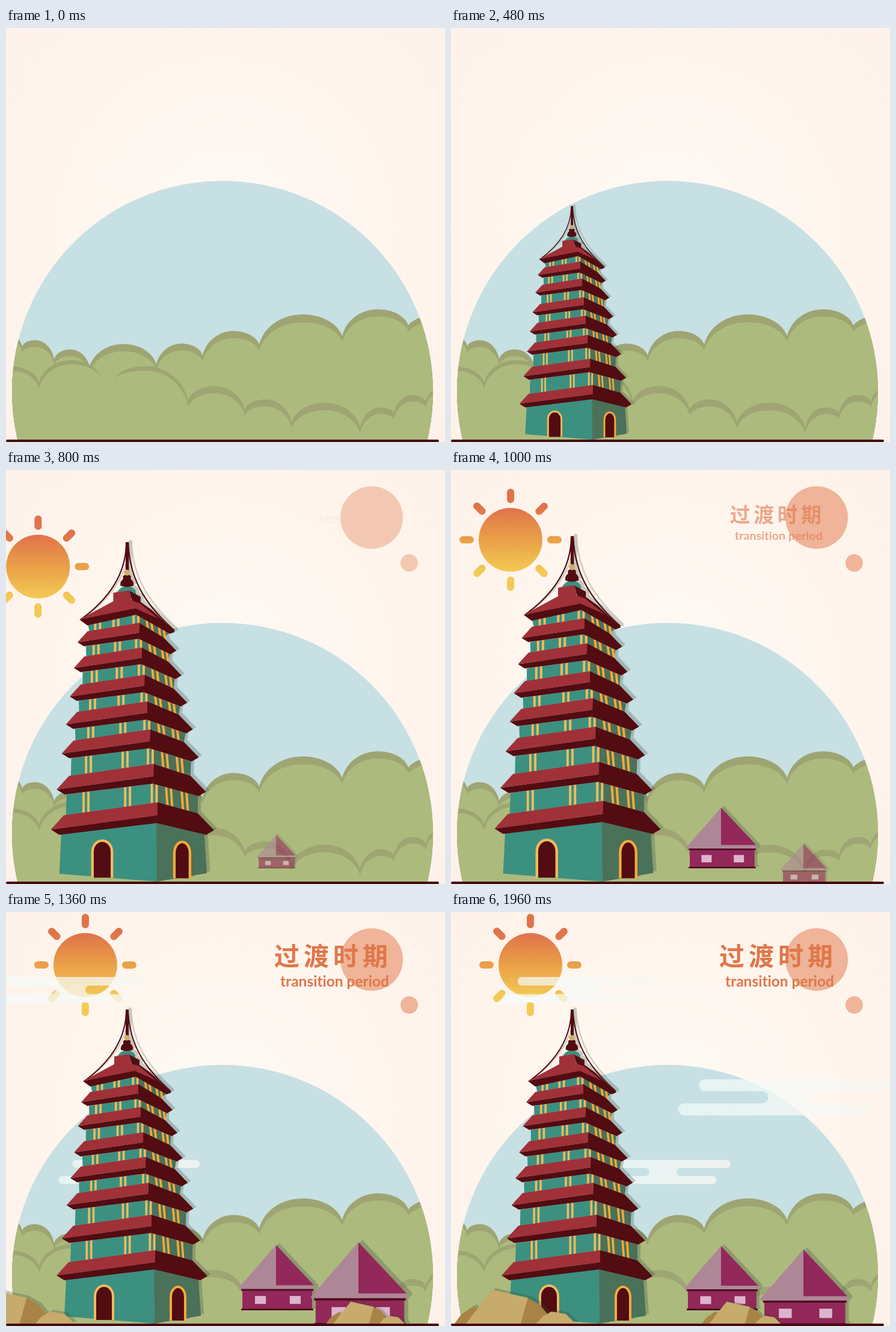
Animation, 730 px wide and 688 px high, one loop 2 s. Source, as an HTML page:

```html
<!DOCTYPE html>
<html lang="zh">
<head>
<meta charset="utf-8">
<style>
html, body { margin: 0; width: 100%; height: 100%; overflow: hidden; background: #fef3eb; }
svg { display: block; }
.shade { filter: drop-shadow(5px -3px 0 rgba(50, 75, 55, .27)); }
#title { font-weight: 700; font-variant-ligatures: none; }
</style>
</head>
<body>
<svg width="730" height="688" viewBox="0 0 730 688" xmlns="http://www.w3.org/2000/svg">
  <defs>
    <radialGradient id="paper" gradientUnits="userSpaceOnUse" cx="365" cy="330" r="520">
      <stop offset="0" stop-color="#fffaf4"/><stop offset="1" stop-color="#fef1e8"/>
    </radialGradient>
    <linearGradient id="glow" gradientUnits="userSpaceOnUse" x1="0" y1="-53" x2="0" y2="53">
      <stop offset="0" stop-color="#e0734a"/><stop offset=".5" stop-color="#eaa048"/><stop offset="1" stop-color="#f3ca55"/>
    </linearGradient>
    <linearGradient id="mist" gradientUnits="userSpaceOnUse" x1="0" y1="0" x2="235" y2="0">
      <stop offset="0" stop-color="#f3fdfc" stop-opacity=".68"/><stop offset="1" stop-color="#f8f6f1" stop-opacity=".8"/>
    </linearGradient>
    <clipPath id="disc"><circle cx="360" cy="604" r="350"/></clipPath>
    <path id="cloud" fill="url(#mist)" d="M29.7 0H228.3a6.65 6.65 0 0 1 0 13.3H152.6a6.65 6.65 0 0 0 0 13.4H205.3
      a6.65 6.65 0 0 1 0 13.3H6.7a6.65 6.65 0 0 1 0-13.3H93.4a6.65 6.65 0 0 0 0-13.4H29.7a6.65 6.65 0 0 1 0-13.3Z"/>
    <g id="house">
      <path fill="#ae8797" d="M0-107L-61-37V-35H64V-39Z"/>
      <path fill="#93285a" d="M0-107V-41H62ZM-55-33H59V-2H-55Z"/>
      <path fill="#520c22" d="M-57-35H61V-32H-57ZM-57-3H61V0H-57Z"/>
      <path fill="#dfb3cf" stroke="#7a1f4b" stroke-width=".8" d="M-35-24h19v14h-19ZM22-24h19v14h-19Z"/>
    </g>
    <g id="rock">
      <path fill="#a98345" d="M0 0L11-15L31-29L39-24L33 0ZM121-43L141-32L168 0H110Z"/>
      <path fill="#c7ab6c" d="M19 0L39-26L63-56L122-43L110 0ZM136 0L147-12L161-20L185-16L201 0Z"/>
    </g>
  </defs>
  <rect width="730" height="688" fill="url(#paper)"/>
  <g clip-path="url(#disc)">
    <rect y="250" width="730" height="438" fill="#c7e0e4"/>
    <g id="hills"></g>
  </g>
  <g id="dots" fill="#efb499"><circle cx="608" cy="79" r="52"/><circle cx="670.5" cy="154.5" r="14.5"/></g>
  <g id="title" fill="#e0774a">
    <text x="446" y="89" font-size="42" letter-spacing="7" font-family="'Noto Sans CJK SC','Noto Sans CJK',sans-serif">过渡时期</text>
    <text x="546.5" y="124" font-size="24.5" text-anchor="middle" font-family="Lato,sans-serif">transition period</text>
  </g>
  <g id="sun"><circle r="53" fill="url(#glow)"/></g>
  <use id="cloudA" href="#cloud"/>
  <use id="cloudB" href="#cloud"/>
  <use id="cloudC" href="#cloud"/>
  <g id="pagoda"><g id="tower" class="shade"></g></g>
  <g id="houseA"><use href="#house" class="shade"/></g>
  <g id="houseB"><use href="#house" class="shade"/></g>
  <g id="rockA"><use href="#rock" class="shade"/></g>
  <g id="rockB"><use href="#rock" class="shade"/></g>
  <rect y="684" width="720" height="4" rx="2" fill="#48090f"/>
</svg>
<script>
const $ = id => document.getElementById(id);
const clamp = u => Math.max(0, Math.min(1, u));
const smooth = u => u * u * (3 - 2 * u);
const poly = (fill, ...pts) => `<path fill="${fill}" d="M${pts.join('L')}Z"/>`;
const RED = '#a03138', DARK = '#520c12', TEAL = '#3c9080', SIDE = '#4a7159', GOLD = '#efbb5e', AMBER = '#f5aa3a';

// A curve that leaves a cusp steeply and reaches a crest level, or the reverse.
function quarter(cusp, crest, rising) {
  const [dx, dy] = [crest[0] - cusp[0], crest[1] - cusp[1]];
  const steep = [cusp[0] + .09 * dx, cusp[1] + .53 * dy], level = [crest[0] - .53 * dx, crest[1]];
  return rising ? `C${steep} ${level} ${crest}` : `C${level} ${steep} ${cusp}`;
}

// A hill bulges between its cusps; wider gaps bulge higher, and the rim tapers at both ends.
function hill(...cusps) {
  const rim = i => i > 0 && i < cusps.length - 1 ? 10 : 0;
  const outline = k => {
    const p = cusps.map(([x, y], i) => [x, y + k * rim(i)]);
    let d = `M${p[0][0]} 700L${p[0]}`;
    for (let i = 1; i < p.length; i++) {
      const [[x0, y0], [x1, y1]] = [cusps[i - 1], cusps[i]], w = x1 - x0;
      const thick = (rim(i - 1) + rim(i)) / 2 + .02 * w;
      const crest = [(x0 + x1) / 2 - .25 * (y1 - y0), (y0 + y1) / 2 - 7 - .26 * w + k * thick];
      d += quarter(p[i - 1], crest, true) + quarter(p[i], crest, false);
    }
    return d + 'V700Z';
  };
  return `<path fill="#9ea572" d="${outline(0)}"/><path fill="#adba7e" d="${outline(1)}"/>`;
}
$('hills').innerHTML =
  hill([-30,530], [27,529], [80,550], [139,563], [250,559], [327,544], [421,526], [559,512], [669,494], [1000,620]) +
  hill([-40,600], [55,589], [159,583]) +
  hill([180,583], [303,619], [397,634], [475,655], [589,664], [645,640], [698,621], [760,615]);

for (let i = 0; i < 8; i++) {
  const a = (i + .001) * Math.PI / 4, at = r => [r * Math.cos(a), r * Math.sin(a)];
  $('sun').innerHTML += `<path d="M${at(67)}L${at(79)}" stroke="url(#glow)" stroke-width="12" stroke-linecap="round"/>`;
}

// Every roof follows from its ridge height: k runs from 0 at the top to 1 at the bottom.
const roofs = [286, 324, 366, 407, 450, 503, 562].map(y => {
  const k = (y - 286) / 276, s = .77 + .23 * k;
  const cx = 220 + 28 * k, lx = 125 - 41 * k, ly = y + 30 + 12 * k, rx = 277 + 58 * k, ry = y + 43;
  return {
    k, left: [lx, ly], right: [rx, ry], top: [cx, y], corner: [cx - 1, y + 32 * s], lip: [cx, y + 20 * s],
    topL: [lx + 20 * s, ly - 22 * s], topR: [rx - 25 * s, ry - 26 * s],
    inL: [lx + 13 * s, ly + 8 * s], inR: [rx - 12 * s, ry + 7 * s]
  };
});

const heightAt = (p, q, x) => p[1] + (q[1] - p[1]) * (x - p[0]) / (q[0] - p[0]);

// A pair of columns around x between the edges a-b above and d-c below.
function pair(x, lean, color, a, b, c, d) {
  return [-3.7, 3.7].map(o => `<path stroke="${color}" stroke-width="3.6" d="M${x + o - lean} ${heightAt(a, b, x + o) - 3}
    L${x + o + lean} ${heightAt(d, c, x + o) + 4}"/>`).join('');
}

function storey(up, low) {
  const k = low.k, b = up.corner, c = low.top;
  const a = [up.inL[0] + 3, up.inL[1]], d = [low.topL[0] + 3, low.topL[1]];
  const e = [up.inR[0] - 1, up.inR[1]], f = low.topR;
  const front = x => pair(x, 0, GOLD, a, b, c, d), side = x => pair(x, 1.2, AMBER, b, e, f, c);
  return poly(TEAL, a, b, c, d) + poly(SIDE, b, e, f, c) +
    front(156 - 18 * k) + front(184 + 18 * k) + front(c[0] - 5) + side(236 + 30 * k) + side(255 + 35 * k);
}

const roof = r => poly(DARK, r.left, r.lip, r.corner, r.inL) + poly(DARK, r.top, r.topR, r.right, r.inR, r.corner) +
  poly(RED, r.topL, r.top, r.lip, r.left);

function door(x, y, w, foot, color) {
  const arch = (m, fill) => `<path fill="${fill}" d="M${x + m} ${foot}V${y + 19}a${w / 2 - m} ${19 - m} 0 0 1 ${w - 2 * m} 0V${foot}Z"/>`;
  return arch(0, color) + arch(4, DARK);
}

const cap = { inL: [138, 289], corner: [214, 273], inR: [268, 301] };
$('tower').innerHTML =
  poly(TEAL, [100,609], [246,592], [247,684], [97,672]) + poly(SIDE, [246,592], [320,610], [324,671], [247,684]) +
  door(146, 619, 34, 678, GOLD) + door(272, 621, 28, 679, AMBER) +
  roofs.map((r, i) => storey(roofs[i - 1] || cap, r)).join('') + roofs.map(roof).join('') +
  `<path fill="none" stroke="${DARK}" stroke-width="2" d="M200 165C199 215 170 252 130 281M203 165C206 225 234 262 274 298"/>
   <path fill="${DARK}" d="M199 162H204V212H199Z"/><ellipse cx="201" cy="240" rx="14" ry="10" fill="${TEAL}"/>
   <path fill="${DARK}" d="M195 214q6-4 12 0v5q5 3 4 10q-10 4-20 0q-1-7 4-10Z"/><circle cx="201" cy="209" r="4.5" fill="#cfae67"/>` +
  poly(DARK, [128,281], [214,262], [214,274], [140,290]) +
  poly(DARK, [205,237], [222,246], [222,254], [240,267], [275,300], [267,303], [214,273]) +
  poly(RED, [128,281], [180,253], [180,240], [205,236], [208,252], [221,256], [250,280], [214,264]);

// Grow past full size, then settle back.
function pop(t, start, peak, hold, end) {
  if (t < peak) return 1.1 * (1 - Math.pow(1 - clamp((t - start) / (peak - start)), 1.33));
  return 1.1 - .1 * smooth(clamp((t - hold) / (end - hold)));
}
// Distance still to go: dist at the time at, easing out to zero at end.
const rest = (t, dist, at, end, power) => dist * Math.pow(Math.max(0, end - t) / (end - at), power);

function place(id, x, y, scale = 1, alpha = 1) {
  $(id).setAttribute('transform', `translate(${x} ${y}) scale(${scale})`);
  $(id).setAttribute('opacity', clamp(alpha));
  $(id).setAttribute('display', alpha > 0 && scale > 0 ? 'inline' : 'none');
}

function draw(t) {
  const grow = pop(t, 0, 840, 1000, 1200);
  place('pagoda', 200 * (1 - grow), 684 * (1 - grow), grow, t / 380);
  place('houseA', 449, 662, pop(t, 600, 1120, 1120, 1440), (t - 600) / 340);
  place('houseB', 586, 687, 1.18 * pop(t, 800, 1320, 1320, 1640), (t - 800) / 340);

  place('sun', 132 - rest(t, 33, 1000, 1390, 2.1), 88 + rest(t, 28, 1000, 1390, 2.3), 1, t > 520);
  place('dots', 0, 0, 1, smooth(clamp((t - 590) / 340)));
  const u = clamp((t - 760) / 400), k = 1 - Math.pow(1 - u, 1.8);
  place('title', 538 * (1 - k), 80 * (1 - k), k, u);

  place('cloudA', 86 - rest(t, 249, 1200, 1872, 3), 108, 1.07, t > 1080);
  place('cloudB', 230 - rest(t, 235, 1200, 2000, 2.23), 412, 1, t > 1000);
  place('cloudC', 376 + rest(t, 192, 1560, 2000, 2), 278, 1.5, t > 1200);
  place('rockA', 7 - rest(t, 135, 1200, 2000, 1.6), 684, 1, t > 1040);
  place('rockB', 417 + rest(t, 182, 1200, 2000, 2.05), 684, .65, t > 1040);
}

function tick() {
  draw(Math.floor(performance.now() % 2000 / 40) * 40);
  requestAnimationFrame(tick);
}
tick();
</script>
</body>
</html>
```
